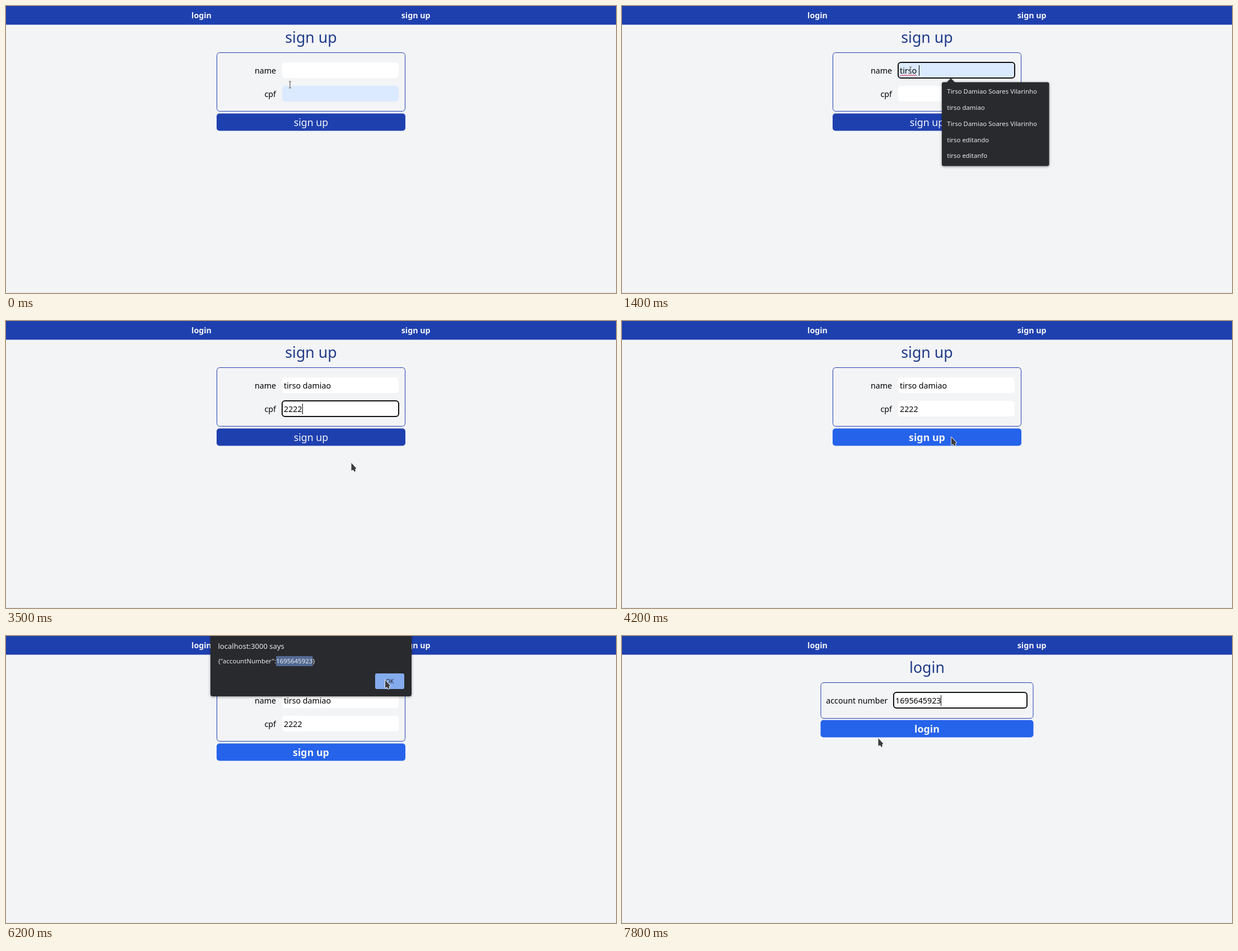
These frames come from a looping animation (1089 by 514 pixels, 8 s). An HTML page:

```html
<!DOCTYPE html>
<html lang="en">
<head>
<meta charset="utf-8">
<title>Sign up and login</title>
<style>
  html, body { margin: 0; width: 100%; height: 100%; overflow: hidden; background: #f3f4f6; }
  svg { display: block; width: 1089px; height: 514px; font-family: "Noto Sans", sans-serif; }
  text { white-space: pre; }
  .popup { filter: drop-shadow(0 1px 2px rgba(0, 0, 0, .45)); }
</style>
</head>
<body>
<svg id="stage" viewBox="0 0 1089 514"></svg>
<script>
const LOOP = 8000;
const BODY = 14.24, SMALL = 11.42;
const NAVY = '#1e40af', BRIGHT = '#2563eb', PALE = '#f3f4f6', HOVER = '#dbeafe', DARK = '#292a2d', LIGHT = '#e8eaed';
const NAME = 'tirso damiao', CPF = '2222', ACCOUNT = '1695645923';
const FULL = 'Tirso Damiao Soares Vilarinho';
const NAMES = [FULL, NAME, FULL, 'tirso editando', 'tirso editanfo', 'teste'];
const ACCOUNTS = [0, 1, 2, 3, 4, 5].map(i => String(+ACCOUNT - i * 1217));

// Each step changes part of the screen state; the rest carries over.
const steps = [[0, {
  page: 'signup', cursor: 'beam', x: 507, y: 141, hover: 'cpf', focus: '',
  name: '', cpf: '', account: '', list: 0, alert: false, ring: true, sel: 0
}]];
const at = (t, change) => steps.push([t, change]);
const move = (t, x, y, more) => at(t, { x, y, ...more });

move(100, 515, 115, { hover: 'name' });
at(400, { focus: 'name', list: 6 });
[800, 900, 1000, 1100, 1200, 1400, 1500, 1600, 1800, 1900, 2000, 2100].forEach((t, i) =>
  at(t, { name: NAME.slice(0, i + 1), list: i < 6 ? 5 : 3 }));
at(2300, { focus: 'cpf', list: 0 });
[2800, 2900, 3000, 3100].forEach((t, i) => at(t, { cpf: CPF.slice(0, i + 1) }));
move(3300, 552, 158, { hover: 'cpf' });
move(3500, 616.5, 254, { cursor: 'arrow', hover: '' });
move(3700, 612, 252);
move(3800, 607, 249);
move(4000, 592, 215, { hover: 'button' });
move(4100, 588, 208, { focus: '' });
at(4300, { alert: true });
move(4500, 556, 62);
move(4800, 528.5, 31);
move(4900, 492, 27);
move(5000, 455, 44, { cursor: 'beam' });
move(5100, 482, 45);
move(5300, 514, 45, { sel: 5, ring: false });
move(5400, 547, 45, { sel: 10 });
move(5600, 598, 62, { cursor: 'arrow' });
move(5800, 642, 72);
move(6000, 668, 77, { hover: 'ok' });
move(6100, 674, 79);
move(6200, 677, 79);
move(6400, 672, 82, { page: 'login', alert: false, hover: '' });
move(6500, 640, 92);
move(6700, 596, 110, { cursor: 'beam', hover: 'account' });
move(6900, 560, 116);
at(7100, { focus: 'account', list: 6 });
at(7300, { account: ACCOUNT, list: 0 });
move(7500, 500, 158, { cursor: 'arrow', hover: 'button' });
move(7600, 474, 170);
move(7800, 457.5, 183);

const pen = document.createElement('canvas').getContext('2d');
function measure(str, size) {
  pen.font = `${size}px "Noto Sans", sans-serif`;
  return pen.measureText(str).width;
}

const rect = (x, y, w, h, fill, r = 0, extra = '') =>
  `<rect x="${x}" y="${y}" width="${w}" height="${h}" rx="${r}" fill="${fill}" ${extra}/>`;
const text = (str, x, y, size, fill = '#000', anchor = 'start', weight = 400) =>
  `<text x="${x}" y="${y}" font-size="${size}" fill="${fill}" text-anchor="${anchor}" font-weight="${weight}">${str}</text>`;

function field(s, id, x, y, w) {
  const focused = s.focus === id;
  const str = s[id], left = x + 3;
  let out = rect(x, y, w, 28, s.hover === id ? HOVER : '#fff', 5,
    focused ? 'stroke="#101010" stroke-width="2"' : '');
  out += text(str, left, y + 19.5, BODY);
  if (id === 'name' && focused && str.includes(' ')) out += squiggle(left, y + 22, measure('tirso', BODY));
  if (focused) out += rect(Math.round(left + measure(str, BODY)), y + 5, 1, 19, '#000');
  return out;
}

function squiggle(x, y, w) {
  let d = `M${x} ${y + 1}`;
  for (let i = 2; i <= w; i += 2) d += `L${x + i} ${y + (i % 4 ? 2.3 : 0)}`;
  return `<path d="${d}" fill="none" stroke="#e5263a" stroke-width="1"/>`;
}

function dropdown(items, x, w) {
  const pitch = 28.75;
  const tip = `<path d="M${x + 8} 137.5l8 -8l8 8z" fill="${DARK}"/>`;
  return `<g class="popup">${rect(x, 136.5, w, 35 + pitch * (items.length - 1), DARK, 3)}${tip}</g>` +
    items.map((item, i) => text(item, x + 9.3, 157.3 + i * pitch, SMALL, LIGHT)).join('');
}

function form(s, title, x, w, h) {
  const hot = s.hover === 'button' || (s.alert && s.page === 'signup');
  const top = 83 + h + (s.page === 'login' ? 3.5 : 4.5);
  return text(title, 544.5, 66, 26.7, '#1e3a8a', 'middle') +
    rect(x + .5, 83.5, w - 1, h, 'none', 5, `stroke="${NAVY}"`) +
    rect(x, top, w, 31, hot ? BRIGHT : NAVY, 5) +
    text(title, 544.5, top + 22.3, 17.8, PALE, 'middle', hot ? 700 : 400);
}

function signup(s) {
  let out = form(s, 'sign up', 376, 337, 105);
  out += text('name', 482, 120.5, BODY, '#000', 'end') + text('cpf', 482, 162.7, BODY, '#000', 'end');
  out += field(s, 'name', 493, 101, 208) + field(s, 'cpf', 493, 143, 208);
  return out + (s.list ? dropdown(NAMES.slice(0, s.list), 571, 191.5) : '');
}

function login(s) {
  let out = form(s, 'login', 354.5, 380, 64);
  out += text('account number', 474.5, 120.5, BODY, '#000', 'end') + field(s, 'account', 485, 101, 238);
  return out + (s.list ? dropdown(ACCOUNTS.slice(0, s.list), 578, 154) : '');
}

function alertBox(s) {
  const before = '{"accountNumber":', x = 378.5;
  const start = x + measure(before, SMALL);
  let out = `<g class="popup">${rect(365, -10, 359, 118, DARK, 4)}</g>`;
  out += text('localhost:3000 says', x, 23.2, 13.05, LIGHT);
  if (s.sel) out += rect(start, 36, measure(ACCOUNT.slice(0, s.sel), SMALL), 18, '#526a92');
  out += text(`${before}${ACCOUNT}}`, x, 48.7, SMALL, LIGHT);
  out += rect(659, 67, 52, 28, s.hover === 'ok' ? '#84abed' : '#8ab4f8', 3);
  if (s.ring) {
    out += rect(659.5, 67.5, 51, 27, 'none', 3, 'stroke="#5f95ea" stroke-width="2"');
    out += rect(661, 69, 48, 24, 'none', 2, `stroke="${DARK}"`);
  }
  return out + text('OK', 685, 85, 10.5, '#202124', 'middle');
}

function pointer({ cursor, x, y }) {
  const beam = 'M-2 -6H-.6L0 -5.4L.6 -6H2M0 -5.4V5.4M-2 6H-.6L0 5.4L.6 6H2';
  const shape = cursor === 'beam'
    ? `<path d="${beam}" fill="none" stroke="#fff" stroke-opacity=".8" stroke-width="2.4"/>
       <path d="${beam}" fill="none" stroke="#333" stroke-width="1"/>`
    : `<path d="M0 0V14L3.2 12.6L5.6 16L7.6 14.8L6.6 11.4L9 10Z" fill="#3c3c40" stroke="#fff"
       stroke-width="1.6" stroke-linejoin="round" paint-order="stroke"/>`;
  return `<g transform="translate(${x} ${y})">${shape}</g>`;
}

function draw(s) {
  return rect(0, 0, 1089, 514, PALE) + rect(0, 513, 1089, 1, '#e3e4e6') +
    rect(0, 0, 1089, 33.5, NAVY) +
    text('login', 349, 21.8, BODY, PALE, 'middle', 700) +
    text('sign up', 731.7, 21.8, BODY, PALE, 'middle', 700) +
    (s.page === 'login' ? login(s) : signup(s)) +
    (s.alert ? alertBox(s) : '') + pointer(s);
}

const stage = document.getElementById('stage');
let shown = -1;
function tick() {
  const t = performance.now() % LOOP;
  const index = steps.findLastIndex(([time]) => time <= t);
  if (index !== shown) {
    shown = index;
    stage.innerHTML = draw(Object.assign({}, ...steps.slice(0, index + 1).map(step => step[1])));
  }
  requestAnimationFrame(tick);
}
tick();
</script>
</body>
</html>
```
